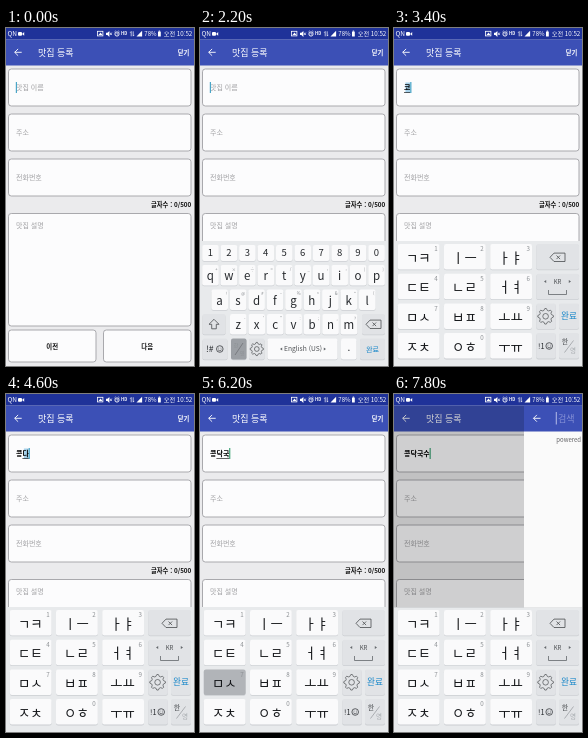
Write an HTML page that moves like this. It is 188 px wide and 338 px high and loops after 8000 ms.

```html
<!DOCTYPE html>
<html lang="ko">
<head>
<meta charset="utf-8">
<title>맛집 등록</title>
<style>
html, body { margin: 0; width: 100%; height: 100%; overflow: hidden; background: #ebebed; }
svg { display: block; width: 100vw; height: 100vh; }
text { font-family: "Noto Sans CJK KR", "Noto Sans CJK", "Noto Sans", sans-serif; white-space: pre; }
</style>
</head>
<body>
<svg id="stage" viewBox="0 0 188 338"></svg>
<script>
const LOOP = 8000, STEP = 200;
const INK = '#25282c', BLUE = '#3c50b6', KEY = '#fafafb', SIDE = '#e1e3e6', DOWN = '#b1b4b8';

const rect = (x, y, w, h, fill, more = '') =>
  `<rect x="${x}" y="${y}" width="${w}" height="${h}" fill="${fill}" ${more}/>`;
const line = (d, color, width = 0.8, more = '') =>
  `<path d="${d}" fill="none" stroke="${color}" stroke-width="${width}" ${more}/>`;
const ring = (x, y, r, color, width) =>
  `<circle cx="${x}" cy="${y}" r="${r}" fill="none" stroke="${color}" stroke-width="${width}"/>`;
const shape = (d, fill) => `<path d="${d}" fill="${fill}"/>`;
// y is the middle of the line of text
const text = (x, y, size, str, fill = INK, anchor = 'start', weight = 400, id = '') =>
  `<text x="${x}" y="${y + size * 0.36}" font-size="${size}" fill="${fill}" text-anchor="${anchor}" font-weight="${weight}" ${id && `id="${id}"`}>${str}</text>`;
const mid = (x, y, size, str, fill, weight) => text(x, y, size, str, fill, 'middle', weight);
const group = (id, body, more = '') => `<g id="${id}" ${more}>${body}</g>`;

const box = (x, y, w, h) =>
  rect(x, y, w, h, '#fcfcfd', 'rx="2.8" stroke="#a9a9ad" stroke-width="1"');
const key = (x, y, w, h, fill = KEY, id = '') =>
  rect(x, y + 0.8, w, h, '#cbced2', 'rx="2"') + rect(x, y, w, h, fill, `rx="2" ${id && `id="${id}"`}`);
const backArrow = (x, y) =>
  line(`M${x + 7.5} ${y}h-7m3.4 -3.4l-3.4 3.4l3.4 3.4`, '#fff', 0.9);
const smile = (x, y) =>
  ring(x, y, 3.3, INK, 0.7) +
  line(`M${x - 1.8} ${y + 0.8}q1.8 2 3.6 0M${x - 1.2} ${y - 1.3}v.8M${x + 1.2} ${y - 1.3}v.8`, INK, 0.6);
const erase = (x, y) =>
  line(`M${x - 7.5} ${y}l4 -4.2h11v8.4h-11zM${x - 1} ${y - 1.8}l3.6 3.6m0 -3.6l-3.6 3.6`, '#4a4d50', 0.8);
const arrows = (left, right, y) =>
  shape(`M${left} ${y}l2.2 -1.6v3.2zM${right} ${y}l-2.2 -1.6v3.2z`, '#63676b');

function gear(x, y, r) {
  const points = Array.from({ length: 32 }, (_, i) => {
    const a = (i - 0.5) * Math.PI / 16, d = i % 4 < 2 ? r : r * 0.78;
    return `${(x + d * Math.sin(a)).toFixed(2)} ${(y - d * Math.cos(a)).toFixed(2)}`;
  });
  return line(`M${points.join('L')}z`, '#4a4d50', 0.7, 'stroke-linejoin="round"') + ring(x, y, r * 0.36, '#4a4d50', 0.7);
}

function statusBar() {
  const w = '#fff';
  return rect(0, 0, 188, 11.5, '#1f3299') +
    text(1.5, 5.7, 6.5, 'QN', w) +
    rect(12, 4, 4, 3.8, w, 'rx="1"') + shape('M16 5.9l2.2 -1.8v3.6z', w) +
    rect(91.5, 3.3, 5.4, 4.6, 'none', `stroke="${w}" stroke-width=".8"`) + shape('M92.5 7l2 -2.4l2 2.4z', w) +
    shape('M100 4.7h1.4l2 -1.8v6l-2 -1.8h-1.4z', w) + line('M104 4.6l1.8 2.4m0 -2.4l-1.8 2.4', w, 0.7) +
    ring(111, 6, 2.1, w, 0.9) + line('M108.5 3.9l1.2 -1.1M113.5 3.9l-1.2 -1.1M111 4.9v1.2h.9', w, 0.7) +
    text(115, 5.8, 4.2, 'HD', w, 'start', 700) +
    line('M125.2 8.3v-4.8l-1 1.2M127.2 3.3v4.8l1 -1.2', w, 0.7) +
    shape('M130.5 8.6h5.6v-5.8z', w) +
    text(138.3, 5.7, 6, '78%', w) +
    rect(152, 3.4, 2.8, 5.2, w, 'rx=".5"') + rect(152.7, 2.6, 1.4, 1, w) +
    text(186.3, 5.7, 6.2, '오전 10:52', w, 'end');
}

function page() {
  const hint = '#a0a0a3';
  const button = (x, label) => box(x, 302, 87.5, 32) + mid(x + 43.7, 318.3, 6.4, label, '#111', 700);
  return rect(0, 0, 188, 338, '#ebebed') +
    rect(0, 11.5, 188, 26, BLUE) + backArrow(8.2, 24.3) +
    text(32, 24.3, 9, '맛집 등록', '#fff', 'start', 500) + text(183.3, 24.3, 6.3, '닫기', '#fff', 'end', 700) +
    [41, 86, 131].map(y => box(2.5, y, 182.5, 37)).join('') + box(2.5, 185.5, 182.5, 112.5) +
    text(10, 59.5, 7, '맛집 이름', hint, 'start', 400, 'nameHint') +
    text(10, 104.5, 7, '주소', hint) + text(10, 149.5, 7, '전화번호', hint) + text(10, 197, 7, '맛집 설명', hint) +
    text(185.3, 177, 6.3, '글자수 : 0/500', '#111', 'end', 700) +
    button(2.5, '이전') + button(97.5, '다음') +
    rect(0, 54.5, 5, 10.5, '#6fb5dc', 'id="mark" opacity=".6"') +
    text(10, 59.5, 7, '', '#000', 'start', 700, 'name') +
    rect(0, 64, 0, 0.7, '#222', 'id="underline"') +
    rect(0, 54, 1.2, 11, '#3a9fb4', 'id="caret"');
}

function englishKeys() {
  let s = rect(0, 213, 188, 126, '#e8eaec');
  const row = (chars, x0, y, h, size, marks = '') => [...chars].forEach((c, i) => {
    const x = x0 + i * 18.45;
    s += key(x, y, 16.6, h) + mid(x + 8.2, y + h / 2 + (marks ? 1 : 0), size, c);
    if (marks) s += text(x + 15.4, y + 4, 4.2, marks[i], '#85898d', 'end');
  });
  row('1234567890', 2.2, 217, 16, 9.5);
  row('qwertyuiop', 2.2, 237, 20.5, 11.5, '+×÷=/_‹›[]');
  row('asdfghjkl', 11.4, 261.5, 20.5, 11.5, '!@#~%^&*(');
  row('zxcvbnm', 30, 286, 20.5, 11.5, "-'\":;,?");
  s += key(2.5, 286, 23, 20.5, SIDE) + line('M14 291.3l5 5h-2.7v4.5h-4.6v-4.5h-2.7z', '#4a4d50', 0.8);
  s += key(162, 286, 23, 20.5, SIDE) + erase(173.5, 296.3);
  s += key(2.5, 310.5, 25, 21, SIDE) + text(6, 321, 8.5, '!#') + smile(19.8, 321);
  s += key(31, 310.5, 15.5, 21, SIDE, 'lang') + line('M35 327l8 -12', '#6a6e72', 0.7) +
    mid(36, 317.5, 5, '한', '#8c9094') + mid(42, 325, 5, '영', '#8c9094');
  s += key(49, 310.5, 15.5, 21, SIDE) + gear(56.8, 321, 6.6);
  s += key(67.5, 310.5, 70, 21) + arrows(80, 126, 321) + mid(103, 321, 6.7, 'English (US)', '#4a4d50');
  s += key(141, 310.5, 15.5, 21) + mid(148.8, 319.5, 10, '.');
  s += key(160, 310.5, 25, 21, SIDE) + mid(172.5, 321, 7.2, '완료', '#1686c9');
  return s;
}

function koreanKeys() {
  const pairs = ['ㄱㅋ', 'ㅣㅡ', 'ㅏㅑ', 'ㄷㅌ', 'ㄴㄹ', 'ㅓㅕ', 'ㅁㅅ', 'ㅂㅍ', 'ㅗㅛ', 'ㅈㅊ', 'ㅇㅎ', 'ㅜㅠ'];
  let s = rect(0, 213, 188, 126, '#e8eaec');
  pairs.forEach((pair, i) => {
    const x = 3.8 + i % 3 * 46.2, y = 216 + Math.floor(i / 3) * 29.7;
    s += key(x, y, 41.8, 25.5, KEY, 'k' + pair) + mid(x + 20.4, y + 13.8, 13.4, pair, '#15171a', 500) +
      text(x + 39.8, y + 5, 6.2, '123456789 0 '[i].trim(), '#8a8e92', 'end');
  });
  s += key(142.3, 216, 42.7, 25.5, SIDE) + erase(163.5, 229.3);
  s += key(142.3, 245.7, 42.7, 25.5, SIDE) + arrows(150, 177, 253.5) + mid(163.5, 253.5, 6, 'KR', '#4a4d50') +
    line('M154.5 262v4.5h18v-4.5', '#63676b', 0.8);
  s += key(142.3, 275.4, 19.5, 25.5, SIDE) + gear(151.6, 288.3, 7.8) +
    key(165, 275.4, 20, 25.5, SIDE) + mid(175, 288, 8.6, '완료', '#1686c9');
  s += key(142.3, 305.1, 19.5, 25.5, SIDE) + text(144, 318, 7.4, '!1') + smile(155.2, 318) +
    key(165, 305.1, 20, 25.5, SIDE) + mid(171, 313.5, 7, '한', '#4a4d50') +
    line('M170.5 324.5l9 -12', '#85898d', 0.6) + mid(179, 322.5, 6.5, '영', '#a5a9ad');
  return s;
}

function searchPage() {
  return rect(0, 11.5, 188, 202, '#000', 'opacity=".18"') +
    rect(130, 11.5, 58, 202, '#fafafa') + rect(130, 11.5, 58, 26, BLUE) +
    backArrow(139, 24.3) + rect(161.8, 18, 0.9, 12.5, '#c2c8ee') +
    text(164, 24.3, 9, '검색', '#8691d6') + text(162.3, 46, 6, 'powered by', '#606064');
}

const stage = document.getElementById('stage');
stage.innerHTML = page() + group('english', englishKeys()) + group('korean', koreanKeys()) +
  group('search', searchPage()) + statusBar();

const el = id => document.getElementById(id);
const show = (id, on) => el(id).setAttribute('visibility', on ? 'visible' : 'hidden');
const set = (id, attr, value) => el(id).setAttribute(attr, value);
// value of the last entry that has begun
const at = (track, t) => track.reduce((v, [start, next]) => t >= start ? next : v, track[0][1]);

const NAME = [[0, ''], [3000, 'ㄱ'], [3200, 'ㅋ'], [3400, '코'], [3800, '콩'],
  [4200, '콩ㄷ'], [4400, '콩다'], [4800, '콩닥'],
  [5200, '콩닥ㄱ'], [5400, '콩닥구'], [5800, '콩닥국'],
  [6400, '콩닥국ㅅ'], [6600, '콩닥국수']];
const CARET = [[0, 1], [200, 0.45], [400, 0], [1000, 1], [1400, 0], [2000, 1], [2400, 0],
  [3000, 1], [4000, 0], [4200, 1], [4800, 0], [5200, 1], [7200, 0.5], [7400, 0], [7800, 1]];
const MARK = [[0, 0], [3400, 1], [3800, 0], [4400, 1], [4800, 0]];
const DROP = [[0, 126], [1000, 52], [1200, 0]];

function draw(now) {
  const t = Math.floor(now % LOOP / STEP) * STEP;
  const name = at(NAME, t), width = name.length * 6.44, sliding = t >= 7800;

  el('name').textContent = name;
  show('nameHint', !name);
  set('caret', 'x', 9.8 + width);
  set('caret', 'opacity', at(CARET, t));
  set('caret', 'fill', name.length > 2 ? '#3fa477' : '#4aa6c8');
  set('mark', 'x', 5 + width);
  show('mark', at(MARK, t));
  set('underline', 'x', name.length > 1 ? 16.4 : 10);
  set('underline', 'width', name.length > 1 ? width - 6.4 : width);
  show('underline', name && !sliding);

  show('english', t >= 1000 && t < 2400);
  set('english', 'transform', `translate(0 ${at(DROP, t)})`);
  set('lang', 'fill', t >= 2000 ? '#9b9fa4' : SIDE);
  show('korean', t >= 2400);
  set('kㅏㅑ', 'fill', t === 4400 ? DOWN : KEY);
  set('kㅁㅅ', 'fill', t === 6200 ? DOWN : KEY);
  show('search', sliding);
}

const begin = performance.now();
function tick() {
  draw(performance.now() - begin);
  requestAnimationFrame(tick);
}
tick();
</script>
</body>
</html>
```
